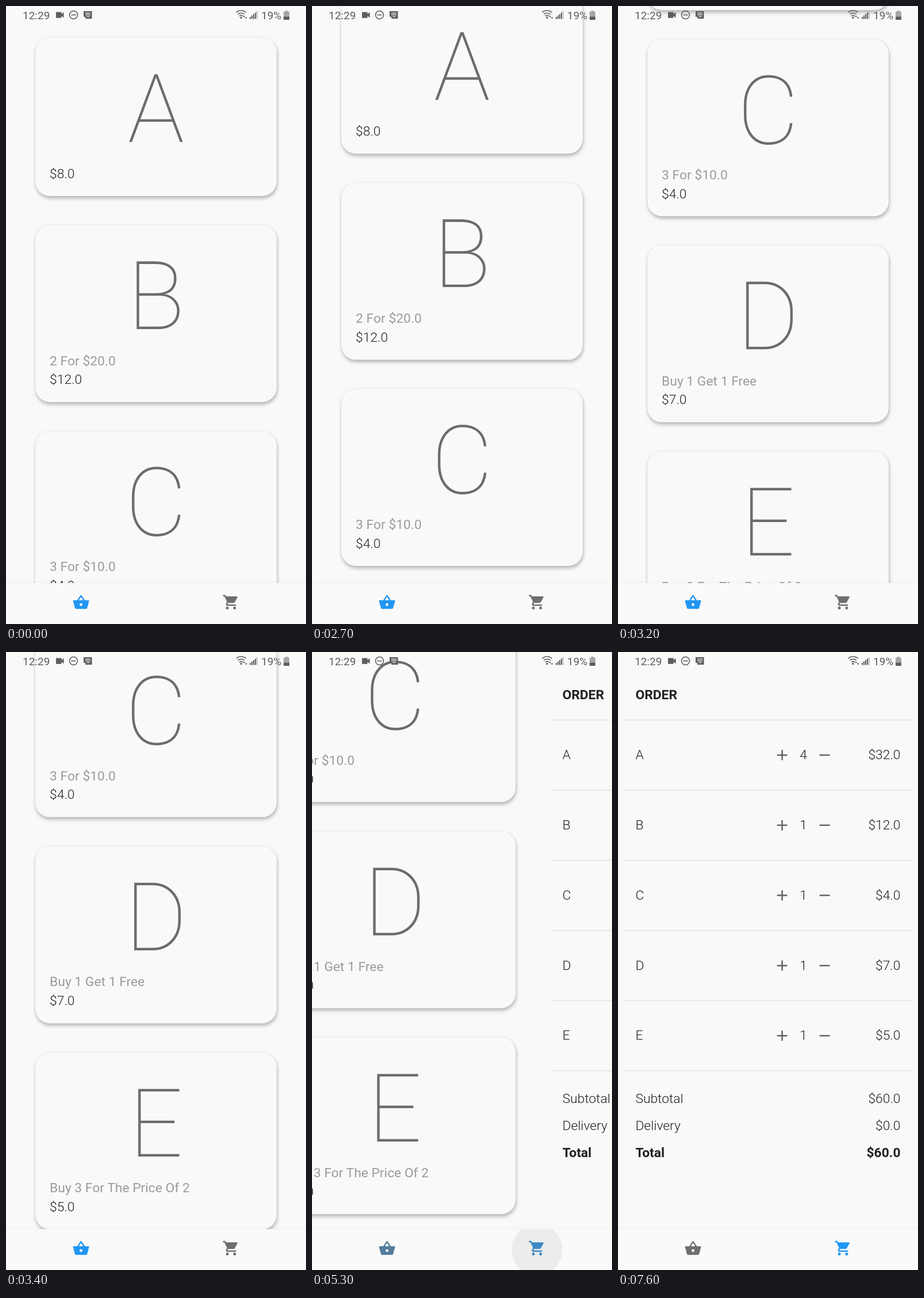
An HTML page for the animation above (8000 ms loop, 522x1073 px).

```html
<!DOCTYPE html>
<html lang="en">
<head>
<meta charset="utf-8">
<title>Shop and order</title>
<style>
  html, body { margin: 0; width: 100%; height: 100%; overflow: hidden; background: #f8faf8; }
  svg { display: block; width: 522px; height: 1073px; font: 300 22.84px Roboto, sans-serif; fill: #1f201f; }
  .letter { font-weight: 100; font-size: 165px; text-anchor: middle; fill: #6b6d6b; }
  .deal { font-weight: 400; fill: #9a9c9a; }
  .bold { font-weight: 700; }
  .end { text-anchor: end; }
  .mid { text-anchor: middle; }
  .card { fill: #f8faf8; filter: drop-shadow(1px 4px 3px rgba(0,0,0,.25)) drop-shadow(0 0 1px rgba(0,0,0,.1)); }
  .rule { stroke: #dfe1df; stroke-width: 1.3; }
  .sign { stroke: #626462; stroke-width: 2.5; }
  .status { font-weight: 400; font-size: 19px; fill: #5c5e5c; }
  .line { fill: none; stroke: #5c5e5c; stroke-width: 1.6; }
  .bar { fill: #f9faf9; filter: drop-shadow(0 -1px 2px rgba(0,0,0,.04)); }
</style>
</head>
<body>
<svg viewBox="0 0 522 1073">
  <defs>
    <clipPath id="navClip"><rect y="1002" width="522" height="71"/></clipPath>
  </defs>
  <g id="shop"></g>
  <g id="order"></g>
  <rect class="bar" y="1002" width="522" height="72"/>
  <g clip-path="url(#navClip)"><circle id="ripple" cx="391.5" cy="1037.5" r="44.4" fill="#000"/></g>
  <path id="basket" transform="translate(115.3 1020.2) scale(1.27)" d="M17.21 9l-4.38-6.56c-.19-.28-.51-.42-.83-.42-.32 0-.64.14-.83.43L6.79 9H2c-.55 0-1 .45-1 1 0 .09.01.18.04.27l2.54 9.27c.23.84 1 1.46 1.92 1.46h13c.92 0 1.69-.62 1.93-1.46l2.54-9.27L23 10c0-.55-.45-1-1-1h-4.79zM9 9l3-4.4L15 9H9zm3 8c-1.1 0-2-.9-2-2s.9-2 2-2 2 .9 2 2-.9 2-2 2z"/>
  <path id="cart" transform="translate(376.2 1019.9) scale(1.27)" d="M7 18c-1.1 0-2 .9-2 2s.9 2 2 2 2-.9 2-2-.9-2-2-2zM1 2v2h2l3.6 7.59-1.35 2.45c-.16.28-.25.61-.25.96 0 1.1.9 2 2 2h12v-2H7.42c-.14 0-.25-.11-.25-.25l.03-.12.9-1.63h7.45c.75 0 1.41-.41 1.75-1.03l3.58-6.49c.08-.14.12-.31.12-.48 0-.55-.45-1-1-1H5.21l-.94-2H1zm16 16c-1.1 0-2 .9-2 2s.9 2 2 2 2-.9 2-2-.9-2-2-2z"/>
  <g class="status">
    <text x="29" y="22.6">12:29</text>
    <path d="M87 10.5h9.5v3.6l4-3.3v9.6l-4-3.3v3.6H87z"/>
    <circle class="line" cx="117.5" cy="15.5" r="7"/>
    <path class="line" d="M113.5 15.5h8"/>
    <path d="M135 9h14.5v13h-11.3v-3.2H135z"/>
    <path stroke="#f8faf8" stroke-width="1.2" d="M138 12.4h9M138 15.4h9M140.5 18.4h5"/>
    <path class="line" d="M400.5 11q8.5-6.4 17 0M403.3 14.4q5.7-4.4 11.4 0M406 17.6q3-2.4 6 0"/>
    <circle cx="409" cy="20.4" r="1.7"/>
    <path d="M412.2 19l1.9-3 1.9 3zM415.8 19.6l1.9 3 1.9-3z"/>
    <path d="M424 19h2v3.5h-2zM427 16.5h2v6h-2zM430 14h2v8.5h-2zM433 11.5h2v11h-2z"/>
    <path d="M436 9h1.3v13.5H436z" opacity=".6"/>
    <text x="444" y="22.6">19%</text>
    <path fill="#a5a7a5" d="M486 8h4v1.7h3V19h-10V9.700h3z"/>
    <path d="M483 18.500h10v5.500h-10z"/>
  </g>
</svg>
<script>
const LOOP = 8000, TURN = 5217;
const items = [
  ["A", 8, ""], ["B", 12, "2 For $20.0"], ["C", 4, "3 For $10.0"],
  ["D", 7, "Buy 1 Get 1 Free"], ["E", 5, "Buy 3 For The Price Of 2"]
];
const el = id => document.getElementById(id);
const money = n => "$" + n.toFixed(1);
const clamp = x => Math.min(1, Math.max(0, x));
const text = (x, y, str, cls = "", id = "") =>
  `<text x="${x}" y="${y}" class="${cls}" id="${id}">${str}</text>`;

function buildShop() {
  let top = 55;
  return items.map(([name, price, deal]) => {
    const height = deal ? 307.4 : 275, bottom = top + height;
    const card = `<rect class="card" x="51" y="${top}" width="420" height="${height}" rx="25.4"/>`
      + text(261, top + 181, name, "letter")
      + (deal ? text(76.1, bottom - 64.2, deal, "deal") : "")
      + text(76.1, bottom - 31.4, money(price));
    top = bottom + 50.4;
    return card;
  }).join("");
}

function buildOrder() {
  const rule = i => `<path class="rule" d="M10.200 ${118.2 + 121.8 * i}h501.600"/>`;
  const rows = items.map(([name, price], i) => {
    const mid = 179 + 121.8 * i, y = mid + 7.1;
    return rule(i) + text(30.4, y, name)
      + `<path class="sign" d="M276.700 ${mid}h17.800m-8.900 -8.900v17.800M350.700 ${mid}h17.800"/>`
      + text(322.5, y, 1, "mid", "count" + name)
      + text(491.5, y, money(price), "end", "price" + name);
  }).join("");
  const sums = ["Subtotal", "Delivery", "Total"].map((name, i) => {
    const y = 783.3 + 46.9 * i, cls = i === 2 ? "bold" : "";
    return text(30.4, y, name, cls) + text(491.5, y, "", cls + " end", name);
  }).join("");
  return text(30.4, 81.6, "ORDER", "bold") + rows + rule(5) + sums;
}

function bezier(x1, y1, x2, y2) {
  const at = (s, a, b) => 3 * s * (1 - s) ** 2 * a + 3 * s * s * (1 - s) * b + s ** 3;
  return x => {
    if (x <= 0 || x >= 1) return clamp(x);
    let lo = 0, hi = 1;
    for (let i = 0; i < 30; i++) {
      const s = (lo + hi) / 2;
      if (at(s, x1, x2) < x) lo = s; else hi = s;
    }
    return at(lo, y1, y2);
  };
}
const ease = bezier(.25, .1, .25, 1), swift = bezier(.4, 0, .2, 1);

// Scroll path: time, offset, speed in px/ms
const path = [[2250, 0, 0], [2700, 73, .45], [3200, 680, .58], [3750, 785, 0]];
function scrollAt(t) {
  if (t <= path[0][0]) return 0;
  for (let i = 1; i < path.length; i++) {
    const [t0, p0, v0] = path[i - 1], [t1, p1, v1] = path[i];
    if (t > t1) continue;
    const d = t1 - t0, u = (t - t0) / d, w = 1 - u;
    return p0 * w * w * (1 + 2 * u) + v0 * d * u * w * w
      + p1 * u * u * (3 - 2 * u) - v1 * d * u * u * w;
  }
  return 785;
}

const grey = [110, 112, 110], blue = [33, 150, 243];
const mix = k => `rgb(${grey.map((c, i) => Math.round(c + (blue[i] - c) * k))})`;

function draw(t) {
  const slide = 522 * ease((t - TURN) / 500);
  el("shop").setAttribute("transform", `translate(${-slide} ${-scrollAt(t)})`);
  el("order").setAttribute("transform", `translate(${522 - slide} 0)`);

  const active = swift((t - TURN) / 200);
  el("basket").setAttribute("fill", mix(1 - active));
  el("cart").setAttribute("fill", mix(active));
  el("ripple").setAttribute("opacity", .055 * clamp((t - 5180) / 90) * clamp((5560 - t) / 200));

  const count = 1 + [6400, 7200, 7500].filter(tap => t >= tap).length;
  const subtotal = 28 + 8 * count, delivery = subtotal > 50 ? 0 : 7;
  el("countA").textContent = count;
  el("priceA").textContent = money(8 * count);
  el("Subtotal").textContent = money(subtotal);
  el("Delivery").textContent = money(delivery);
  el("Total").textContent = money(subtotal + delivery);
}

el("shop").innerHTML = buildShop();
el("order").innerHTML = buildOrder();
const start = performance.now();
function tick() {
  draw((performance.now() - start) % LOOP);
  requestAnimationFrame(tick);
}
tick();
</script>
</body>
</html>
```
